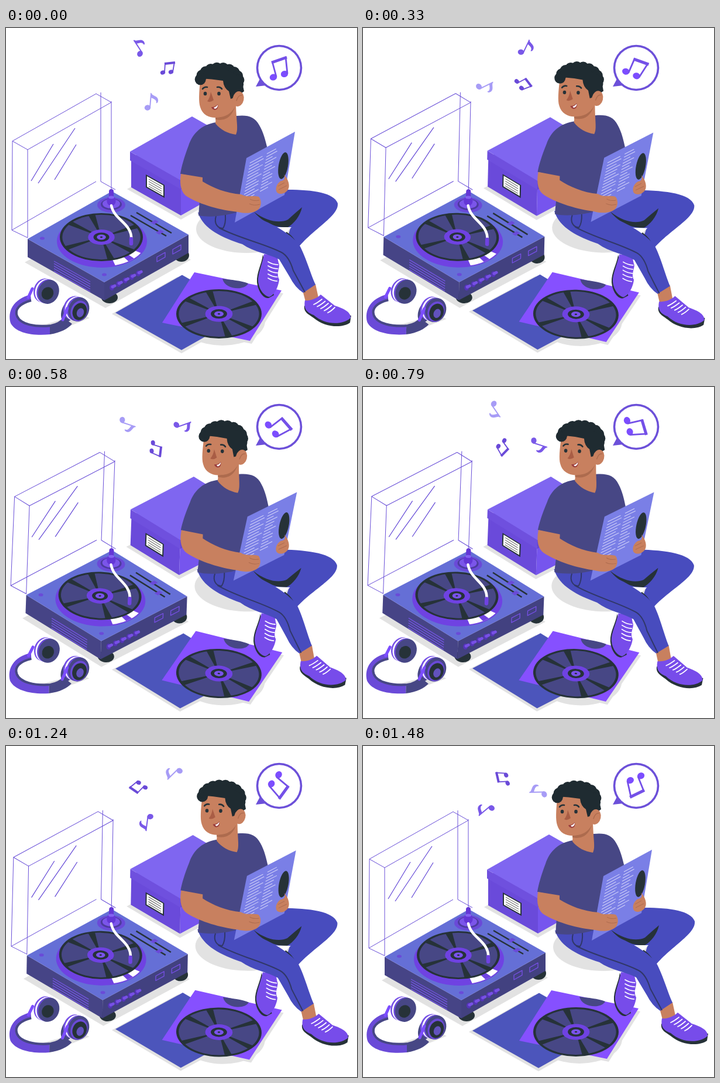
These frames come from a looping animation (600 px wide and 565 px high, 1.51 s). An HTML page with a canvas:

```html
<!DOCTYPE html>
<html lang="en">
<head>
<meta charset="utf-8">
<title>Listening to records</title>
<style>
html, body { margin: 0; width: 100%; height: 100%; overflow: hidden; background: #fff; }
canvas { display: block; }
</style>
</head>
<body>
<canvas id="stage" width="600" height="565"></canvas>
<script>
const ctx = document.getElementById('stage').getContext('2d');
const LOOP = 1510, RAD = Math.PI / 180, SWAY = 2.2, SLOPE = 0.565;
const C = {
  dark: '#263238', hair: '#1f2b31', navy: '#474785', deck: '#656fd6', denim: '#484cbe',
  violet: '#6a4ad8', purple: '#6f42e2', bright: '#7c4dff', shoe: '#774cea',
  skin: '#c8805f', shade: '#ad6b4e', shadow: '#e2e2e2', white: '#fff', paper: '#7a7fe6'
};

function fill(color, d) {
  ctx.fillStyle = color;
  ctx.fill(new Path2D(d));
}

function line(color, width, d, cap = 'butt') {
  ctx.strokeStyle = color;
  ctx.lineWidth = width;
  ctx.lineCap = cap;
  ctx.lineJoin = 'round';
  ctx.stroke(new Path2D(d));
}

function oval(color, x, y, rx, ry = rx, deg = 0) {
  ctx.fillStyle = color;
  ctx.beginPath();
  ctx.ellipse(x, y, rx, ry, deg * RAD, 0, 7);
  ctx.fill();
}

function turned(x, y, deg, draw) {
  ctx.save();
  ctx.translate(x, y);
  ctx.rotate(deg * RAD);
  ctx.translate(-x, -y);
  draw();
  ctx.restore();
}

function repeat(count, draw) {
  for (let i = 0; i < count; i++) draw(i);
}

// Isometric shapes start at their left corner; a runs down-right, b runs up-right.
const rhomb = (x, y, a, b) => `M${x} ${y}l${b} ${-b * SLOPE} ${a} ${a * SLOPE} ${-b} ${b * SLOPE}Z`;
const leftWall = (x, y, a, h) => `M${x} ${y}l${a} ${a * SLOPE}v${h}l${-a} ${-a * SLOPE}Z`;
const rightWall = (x, y, b, h) => `M${x} ${y}l${b} ${-b * SLOPE}v${h}l${-b} ${b * SLOPE}Z`;

function prism(x, y, a, b, h, [top, left, right]) {
  fill(left, leftWall(x, y, a, h));
  fill(right, rightWall(x + a, y + a * SLOPE, b, h));
  fill(top, rhomb(x, y, a, b));
}

function record(x, y, rx, ry) {
  oval(C.dark, x, y, rx, ry);
  oval(C.navy, x, y, rx * 0.94, ry * 0.93);
  ctx.fillStyle = C.dark;
  for (const axis of [38, 76, 152, 218, 256, 332]) {
    ctx.beginPath();
    ctx.moveTo(x, y);
    ctx.ellipse(x, y, rx * 0.95, ry * 0.95, 0, (axis - 5) * RAD, (axis + 5) * RAD);
    ctx.fill();
  }
  [[C.purple, 0.32], [C.dark, 0.19], ['#7a52ec', 0.11], [C.dark, 0.03]]
    .forEach(([color, k]) => oval(color, x, y, rx * k, ry * k));
}

function box() {
  fill(C.shadow, rhomb(207, 275, 92, 110));
  prism(214, 222, 85, 104, 50, ['#6b4cdc', '#6a4ada', '#7655ee']);
  prism(212, 211, 87, 106, 15, ['#7f66f0', '#6f50de', '#6446d2']);
  fill(C.dark, leftWall(239, 250, 32, 22));
  fill(C.white, leftWall(241, 253, 28, 18));
  repeat(4, i => line('#555', 1, `M244 ${258 + i * 4}l22 ${22 * SLOPE}`));
}

function lid() {
  const edge = '#6a50d8';
  line(edge, 1, rhomb(11, 193, 26, 143));
  line(edge, 1, 'M11 193 10 345 37 358V207M10 345 154 262M162 110V262L187 276M180 125V278');
  line(edge, 1.3, 'M43 261 81 198M55 265 118 171M83 259 120 199');
}

function platter() {
  oval(C.purple, 164, 364, 77, 45);
  ctx.save();
  ctx.beginPath();
  ctx.ellipse(164, 364, 75, 43, 0, 0, 7);
  ctx.clip();
  fill(C.white, 'M164 357 250 392 190 412Z');
  fill(C.purple, 'M164 357 232 402 220 408Z');
  ctx.restore();
  record(163, 357, 71, 41);
}

function turntable() {
  fill(C.shadow, rhomb(32, 400, 138, 146));
  lid();
  oval(C.dark, 300, 388, 13, 11);
  oval(C.dark, 177, 460, 14, 10);
  prism(37, 360, 131, 144, 31, [C.deck, '#464486', '#424180']);
  platter();

  repeat(5, i => line('#7353df', 1.4, `M82 ${398 + i * 4.2}l62 35`));
  repeat(5, i => {
    const x = 183 + i * 11.3, y = 442 - i * 6;
    oval('#5434b8', x - 2, y + 1, 4, 5);
    line('#7750e5', 5, `M${x - 1} ${y}l4 -2`, 'round');
  });
  repeat(2, i => line('#7750e5', 1.3, rightWall(258 + i * 27, 391 - i * 13, 14, 8)));
  oval(C.violet, 62, 359, 4, 2.5);
  oval(C.violet, 168, 421, 4, 2.5);

  line(C.dark, 2.5, 'M223 315 283 350M213 320 274 355');
  repeat(2, i => fill(C.violet, rhomb(247 + i * 9, 332 + i * 17, 6, 8)));

  [[C.violet, 24], ['#4c3b9e', 18], ['#7b55ea', 15]].forEach(([color, r], i) => oval(color, 180, 302 - i, r, r * 0.54));
  line('#6437d6', 15, 'M180 296V294', 'round');
  line('#6437d6', 8, 'M180 279V290', 'round');
  oval('#8462f2', 180, 289, 5, 2.5);
  line(C.white, 4.5, 'M180 303C184 322 201 329 209 342Q215 351 214 361', 'round');
  line(C.purple, 6.5, 'M214 360V368', 'round');
}

function earcup(x, y, lean) {
  const layers = ['#7650e7', C.white, C.violet, C.navy];
  layers.forEach((color, i) => oval(color, x + i * lean, y + i * 0.8, 17.5, 21, 22));
}

function headphones() {
  fill(C.shadow, 'M18 513C55 535 95 514 143 495L128 488 70 505Z');
  fill(C.violet, 'M42 455C12 463 2 484 8 504C17 521 47 526 75 523V509C46 511 24 503 20 490C17 478 28 469 43 466Z');
  fill(C.navy, 'M75 523C94 520 106 513 113 505L99 495C93 503 84 507 75 509Z');
  line(C.navy, 4, 'M43 465C24 470 14 480 19 492C25 506 50 511 77 508Q92 505 100 495');
  line(C.bright, 5, 'M45 445 38 460', 'round');

  earcup(65, 448, 2.6);
  oval(C.dark, 71, 453, 10, 11, 30);
  oval(C.navy, 106, 484, 11, 19, 18);
  earcup(116, 478, 2.8);
  oval(C.violet, 125, 483, 14, 18, 20);
  oval(C.dark, 126, 484, 12, 15, 20);
  oval('#6252bd', 127, 486, 6, 8, 20);
  line(C.bright, 5, 'M97 498 105 478', 'round');
}

function sleeves() {
  const cover = (x, y) => `M${x} ${y}l149 31 -54 86 -150 -31Z`;
  fill(C.shadow, rhomb(181, 488, 119, 112));
  fill(C.shadow, cover(325, 422));
  oval(C.shadow, 370, 500, 73, 42);
  fill('#4c55bb', rhomb(187, 486, 113, 114));
  fill('#8650ff', cover(322, 417));
  fill(C.navy, 'M370 428C374 447 408 449 414 436C402 431 385 430 370 428Z');
  record(364, 488, 73, 42);
}

function backFoot() {
  fill(C.dark, 'M439 387C437 404 428 417 429 434C431 450 440 462 449 461L458 456Z');
  fill(C.shoe, 'M441 386C438 404 430 420 431 433C433 449 443 458 450 459C459 456 466 441 467 429C461 418 470 407 466 401L463 388Z');
  repeat(5, i => line(C.white, 1.7, `M448 ${399 + i * 7}q8 5 ${17 - i * 0.4} 5`, 'round'));
}

function frontFoot() {
  fill(C.skin, 'M507 448 529 437 534 460 520 469 512 467Z');
  fill(C.dark, 'M510 474C508 486 520 490 526 495C545 511 574 513 588 503L590 491Z');
  fill(C.shoe, 'M511 465C508 481 516 486 526 490C546 508 576 507 589 495C590 484 575 478 562 474L538 455C532 461 522 466 511 465Z');
  repeat(5, i => line(C.white, 1.8, `M${526 + i * 6} ${472 + i * 3.5}q5 -2 ${14 - i * 0.5} -9`, 'round'));
}

function legs() {
  oval(C.shadow, 411, 343, 86, 41);
  fill(C.denim, 'M400 318 470 276C520 275 560 280 567 299C570 322 520 345 494 382L478 368 486 342 462 340Z');
  fill(C.dark, 'M424 314C448 332 470 333 482 327Q494 316 506 306C503 321 492 334 482 340C462 341 440 333 424 314Z');
  fill(C.white, 'M458 340 488 340 478 350Z');
  line(C.dark, 5, 'M478 350Q494 360 498 379');
  backFoot();
  frontFoot();
  fill(C.denim, 'M328 315 400 314C435 324 478 343 500 368C511 386 520 418 529 438L508 452Q494 443 485 425L467 395C448 385 424 383 404 369C370 358 338 344 328 315Z');
  line('#303768', 2, 'M359 321C355 334 362 342 371 342Q376 334 375 319M364 341C398 359 442 368 471 383Q484 390 491 414L511 451');
}

function paper() {
  fill(C.paper, 'M411 222 494 177 476 285 391 332Z');
  oval(C.dark, 474, 235, 8, 23, 10);
  const at = (a, b) => `${411 + 83 * a - 20 * b} ${222 - 45 * a + 109 * b}`;
  repeat(13, i => {
    const b = 0.12 + i * 0.049, wobble = 0.05 * Math.sin(i * 2.4);
    line('#cfd0f8', 1.1, `M${at(0.1, b)}L${at(0.36 + wobble, b)}M${at(0.45, b)}L${at(0.64 + wobble, b)}`);
  });
}

function torso() {
  fill(C.navy, 'M359 161C335 165 319 179 312 201C304 222 300 237 298 249L334 256 329 320C352 325 388 318 402 312L447 206C443 190 440 178 433 166C425 151 413 148 394 150Z');
  paper();
  fill(C.skin, 'M299 249C296 269 300 282 310 288C333 302 368 311 396 314C413 318 426 315 432 309C438 302 436 292 432 288C422 285 411 290 402 284C376 282 354 273 336 262V255Z');
  fill(C.skin, 'M475 250C483 258 486 270 482 276C475 286 463 284 462 278C460 270 466 263 470 261C476 261 478 255 475 250Z');
  line(C.shade, 1, 'M433 294Q423 296 417 292M434 301Q424 304 416 300M465 270 476 264M466 276 480 269');
}

function head() {
  fill(C.skin, 'M359 145 358 163C367 174 379 180 393 182C398 172 393 158 393 125Z');
  fill(C.shade, 'M358 152C371 154 384 148 391 135C385 155 371 159 358 156Z');
  fill(C.skin, 'M332 88C330 111 329 126 332 135C336 149 349 154 360 153C376 151 386 141 391 130L394 90 350 75Z');

  repeat(11, i => {
    const a = (186 + i * 19) * RAD;
    oval(C.hair, 365 + 33 * Math.cos(a), 90 + 22 * Math.sin(a), 9.5);
  });
  fill(C.hair, 'M331 86Q352 87 371 90Q372 102 381 108L384 121 393 118 407 108 402 84 371 68 340 74Z');

  oval(C.skin, 397, 121, 9.5, 13, 12);
  line(C.shade, 1.4, 'M394 124Q397 114 403 115', 'round');
  fill('#a95d45', 'M350 109Q349 119 344 125Q349 128 355 123Z');
  oval(C.dark, 340.5, 112, 2.8, 3.2);
  oval(C.dark, 364, 112, 2.8, 3.2);
  line(C.dark, 2.6, 'M336 104Q339 100 344 101M361 101Q366 100 369 104', 'round');
  fill('#9a3d3d', 'M351 135Q358 135 362 130Q364 139 357 140Q352 139 351 135Z');
  fill(C.white, 'M355 136Q359 135 362 131Q362 137 357 138Z');
}

function person() {
  legs();
  torso();
  head();
}

function singleNote(color, x, y, deg) {
  ctx.save();
  ctx.translate(x, y);
  ctx.rotate(deg * RAD);
  oval(color, 0, 0, 5.3, 4.6, -20);
  line(color, 2, 'M4 0V-25');
  fill(color, 'M3 -26C6 -20 16 -22 17 -14Q17 -9 14 -9C15 -16 7 -16 4 -18Z');
  ctx.restore();
}

function notes(t) {
  turned(252, 79, t * 0.178, () => {
    singleNote('#7958e8', 229, 44, -33);
    singleNote('#a79cf6', 242, 136, 5);
    oval(C.violet, 268, 76, 4.2, 3.5, -20);
    oval(C.violet, 282, 75, 4.2, 3.5, -20);
    line(C.violet, 1.8, 'M271 76 272 60M285 75 288 58');
    line(C.violet, 4, 'M271 61 289 59');
  });
}

function bubble(t) {
  oval('#6c50d9', 467, 68, 39.3);
  oval(C.white, 467, 68, 35.7);
  fill('#6c50d9', 'M427 100 434 87 445 98Z');
  turned(467, 68, t * 0.117, () => {
    oval(C.bright, 457, 84, 6.3, 5.5, -20);
    oval(C.bright, 476, 78.5, 6.3, 5.5, -20);
    line('#7450e8', 2.8, 'M462 83 455 57M481 78 478 49');
    line('#7450e8', 5, 'M454 59 480 50');
  });
}

// Poses hold for 30 ms each, with one 40 ms hold shortly before 520 ms.
function heldTime(t) {
  const lag = t < 520 ? 0 : 10;
  return Math.floor((t - lag) / 30) * 30 + lag;
}

function frame(now) {
  const t = heldTime(now % LOOP);
  const sway = SWAY * Math.sin(Math.PI * Math.min(t / 1480, 1));
  ctx.fillStyle = C.white;
  ctx.fillRect(0, 0, 600, 565);
  turned(268, 235, sway, box);
  turned(175, 290, sway, turntable);
  turned(75, 475, sway, headphones);
  turned(335, 485, sway, sleeves);
  turned(430, 270, sway, person);
  notes(t);
  bubble(t);
}

const start = performance.now();
function tick() {
  frame(performance.now() - start);
  requestAnimationFrame(tick);
}
tick();
</script>
</body>
</html>
```
